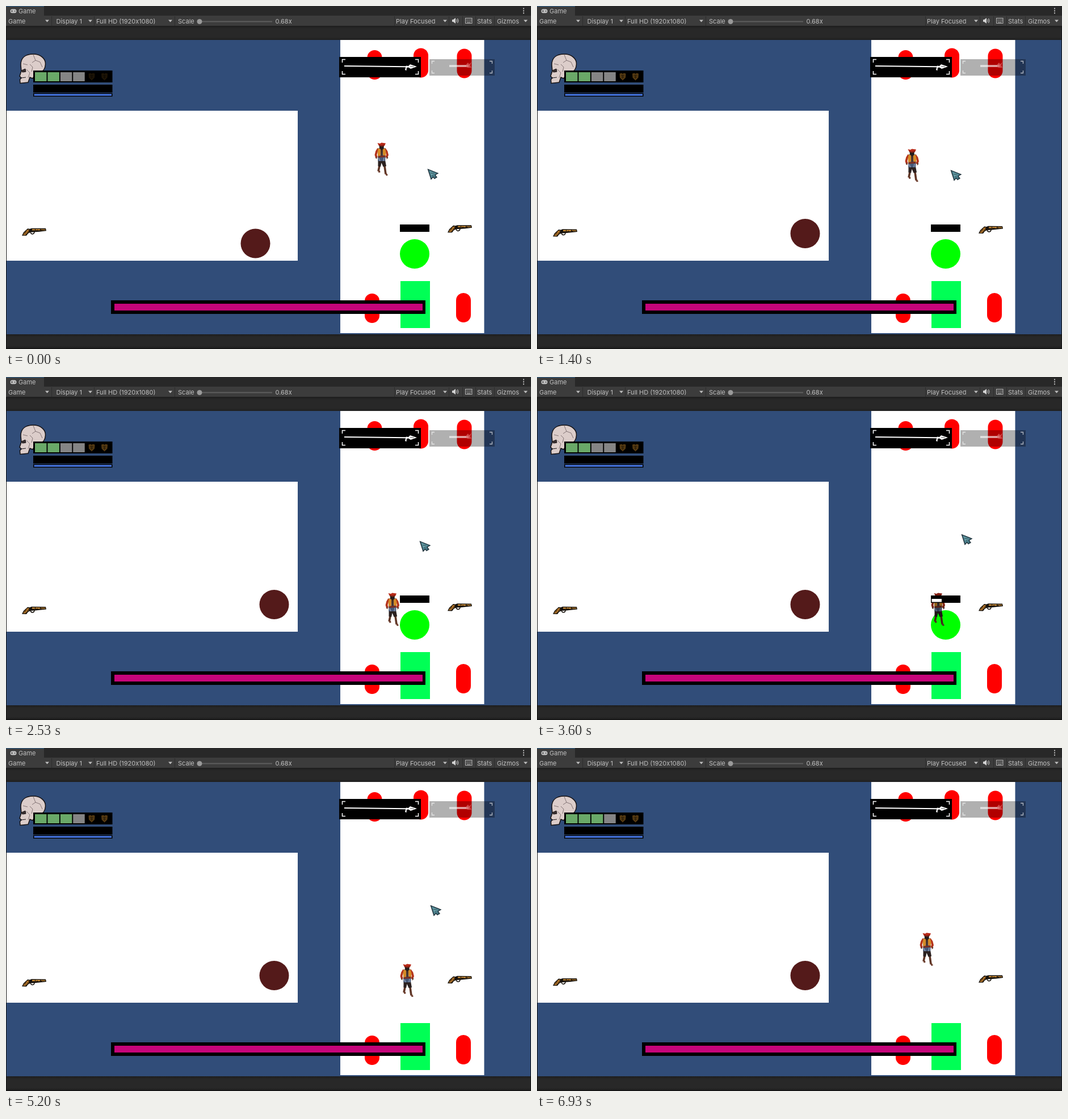
These frames come from a looping animation (925 px wide and 606 px high, 6.99 s). An HTML page:

```html
<!DOCTYPE html>
<html lang="en">
<head>
<meta charset="utf-8">
<title>Game view</title>
<style>
  html, body { margin: 0; width: 100%; height: 100%; overflow: hidden; background: #282828; }
  svg { display: block; width: 925px; height: 606px; }
  text { font: 11px Inter, "Liberation Sans", sans-serif; fill: #c0c0c0; }
</style>
</head>
<body>
<svg viewBox="0 0 925 606">
  <defs>
    <linearGradient id="edge" x2="0" y2="1">
      <stop offset="0" stop-color="#1d1d1d"/><stop offset=".2" stop-color="#282828"/>
      <stop offset=".8" stop-color="#282828"/><stop offset="1" stop-color="#1f1f1f"/>
    </linearGradient>
    <path id="drop" d="M0 0H7L3.5 4Z" fill="#c0c0c0"/>
    <rect id="pill" width="26" height="52" rx="13" fill="#f00"/>
    <g id="gun">
      <path d="M10 1.5L14 2 17 .8 42 1 43 5.5 31 6.8 24 7.5 15 8 11 10 8 14 0 13.8 3 8Z" fill="#15100a"/>
      <path d="M9 3.8L13 3 12 7.5 8 10.5 6.5 12.6 2 12.6 5 8Z" fill="#b8792c"/>
      <path d="M18 3.4H41" stroke="#cf8f38" stroke-width="2.2" stroke-dasharray="5 1 8 1.5"/>
      <path d="M8 5L5 11M13 4L9 9M22 6L28 4M32 5L37 3" stroke="#2a1b0b" stroke-width="1"/>
      <path d="M15 7.5Q16 11.5 19 11Q22 10.5 22 7" fill="none" stroke="#15100a" stroke-width="1.5"/>
    </g>
    <g id="shield">
      <path d="M-5.5 -5L-2 -6 0 -4.5 2 -6 5.5 -5 5 2 0 7 -5 2Z" fill="#553a12"/>
      <path d="M-3 -2H3M-2.5 1H2.5M0 -3V4" stroke="#241806" stroke-width="1"/>
    </g>
  </defs>

  <!-- editor chrome -->
  <rect width="925" height="606" fill="#282828"/>
  <rect width="67" height="18" fill="#3c3c3c"/>
  <rect width="67" height="1" fill="#2c5d87"/>
  <rect y="17" width="925" height="18" fill="#3c3c3c"/>
  <rect y="35" width="925" height="25" fill="url(#edge)"/>
  <rect y="580" width="925" height="25" fill="url(#edge)"/>
  <rect y="604.5" width="925" height="1.5" fill="#151515"/>
  <path d="M80.5 18V35M155.5 18V35M297.5 18V35M684.5 18V35M780.5 18V35M804.5 18V35M827.5 18V35M860.5 18V35" stroke="#2d2d2d"/>
  <g id="labels"></g>
  <rect x="7.500" y="5.500" width="11" height="7" rx="3.500" fill="#c4c4c4"/>
  <path d="M9 9H12M10.500 7.500V10.500M14 9H17" stroke="#3c3c3c"/>
  <path d="M912 3.500V5.500M912 7.500V9.500M912 11.500V13.500" stroke="#c0c0c0" stroke-width="2"/>
  <use href="#drop" x="69" y="24.500"/><use href="#drop" x="145" y="24.500"/>
  <use href="#drop" x="286" y="24.500"/><use href="#drop" x="770" y="24.500"/>
  <use href="#drop" x="912" y="24.500"/>
  <path d="M345 27.500H469" stroke="#5e5e5e" stroke-width="2"/>
  <circle cx="341" cy="27.500" r="4.500" fill="#999"/>
  <path d="M786 24H788L792 21V31L788 28H786Z" fill="#d0d0d0"/>
  <path d="M793.500 23.500Q795.500 26 793.500 28.500M795.500 22Q798.500 26 795.500 30" fill="none" stroke="#d0d0d0"/>
  <rect x="809.500" y="21.500" width="11.500" height="9" fill="none" stroke="#b5b5b5"/>
  <path d="M811 24H820M811 26.500H820" stroke="#b5b5b5" stroke-dasharray="1.500 1"/>
  <path d="M812 29H818.500" stroke="#b5b5b5"/>

  <!-- level -->
  <rect y="60" width="925" height="520" fill="#314d79"/>
  <rect y="185" width="514" height="265" fill="#fff"/>
  <rect x="589" y="60" width="253.500" height="518" fill="#fff"/>
  <use href="#pill" x="636.500" y="78"/><use href="#pill" x="718" y="74.500"/>
  <use href="#pill" x="794.500" y="75.500"/><use href="#pill" x="632" y="508"/>
  <use href="#pill" x="793" y="507"/>
  <rect x="695" y="486" width="52" height="83" fill="#00ff55"/>
  <circle id="ball" r="26" fill="#541a1a"/>
  <circle id="pickup" cx="720" cy="438" r="26" fill="#0f0"/>
  <use id="gunL" href="#gun"/>
  <use id="gunR" href="#gun"/>

  <g id="hero">
    <path d="M8 33L7.500 44 6 51M15.500 33L17.500 45 19 56" fill="none" stroke="#5e3526" stroke-width="3.600"/>
    <path d="M5 49L9 50 9.500 53 6.500 53.500ZM17 54L20.500 54 23 58 20 59Z" fill="#6f4030"/>
    <path d="M5.500 31L18 31 20 42 14.500 43 11.500 36 10 43 5.500 42Z" fill="#2b2120"/>
    <path d="M6 11L3 16 1.500 22 3 27M17 11L20.500 16 22 22 20 27" fill="none" stroke="#b5341c" stroke-width="3.800"/>
    <path d="M2 24L1 28 4 29M21 24L23.500 27 20.500 30" fill="#5e3526"/>
    <path d="M6 10L17.500 10 19 22 18 33 5.500 33 5 21Z" fill="#46597a"/>
    <path d="M6 10L10 12 10 23 5.500 25 4.500 17ZM17.500 10L14 12 14 22 18.500 25 19.500 17Z" fill="#d58a25"/>
    <path d="M10 12H14L13 25 11 25Z" fill="#4a3024"/>
    <path d="M6 24L18 23 18 26 6 27Z" fill="#7a2f22"/>
    <path d="M7 28L9 33M16 27L15 33" stroke="#8c9db2" stroke-width="1.500"/>
    <path d="M7.500 5H16L15.500 11 12 13.500 8 10.500Z" fill="#261c1a"/>
    <path d="M4.500 1L9 2 11.500 .5 19 1.500 17 6 12 7 7 6Z" fill="#b92a18"/>
    <path d="M7 4.800Q12 7 16.500 4.500" fill="none" stroke="#621710"/>
  </g>

  <g id="meter">
    <rect x="694" y="386" width="52" height="13"/>
    <rect id="fill" x="695.500" y="392" height="5.500" fill="#fff"/>
  </g>

  <!-- boss bar -->
  <rect x="185" y="520" width="554" height="24"/>
  <rect x="191" y="526" width="543" height="12" fill="#c6057a"/>

  <!-- weapon slots -->
  <rect x="587" y="90" width="144" height="36"/>
  <path d="M592.500 100V94.500H598M721 94.500H726.500V100M592.500 115V120.500H598M721 120.500H726.500V115" fill="none" stroke="#fff" stroke-width="1.500"/>
  <path d="M596 106L706 107.300" stroke="#fff" stroke-width="2"/>
  <path d="M705 105.500L709 106 712 103 724 107 713 111 709 108.500 706 109 705.500 114 703 113 704 109Z" fill="#fff"/>
  <path d="M712 107H719" stroke="#555"/>
  <rect x="746" y="94" width="115" height="29" fill="#000" fill-opacity=".31"/>
  <g opacity=".65">
    <path d="M750.500 102V97.500H755M852 97.500H856.500V102M750.500 114V118.500H755M852 118.500H856.500V114" fill="none" stroke="#fff" stroke-width="1.300"/>
    <path d="M781 106H815" stroke="#fff" stroke-width="3.500"/>
  </g>
  <path d="M811 103L814 100 816 103 820 99 818 105 820 109 814 109 811 108Z" fill="#d66" opacity=".7"/>

  <!-- player status -->
  <path d="M26 104C26 90 36 85 48 85C62 85 70 94 69.500 103C69 111 65 116 60 117L51 121 47 128 42 126 39 135 25 136.500 24.500 130 27 127 24 124 27 115Z" fill="#dccdca" stroke="#161214" stroke-width="1.500"/>
  <path d="M27 114L34 111 35 116 29 117ZM27 127L35 126" fill="#3a3030" stroke="#1d1719"/>
  <path d="M36 112L42 118 39 127M42 103L47 108 45 116M48 86L52 96 60 99 64 108M30 102L38 104M52 96L46 100" fill="none" stroke="#6d5d60" stroke-width=".8"/>
  <rect x="48" y="114" width="139.500" height="21"/>
  <g id="cells"></g>
  <g id="shields"><use href="#shield" x="151" y="124.500"/><use href="#shield" x="173.500" y="124.500"/></g>
  <rect x="48" y="139" width="139.500" height="14"/>
  <rect x="48" y="154" width="139.500" height="6"/>
  <rect x="49.500" y="155.500" width="136.500" height="3" fill="#4a7df0"/>

  <g id="cursor">
    <path d="M.5 .5L18 7.500 13 10.500 16 14.500 12 17 9.500 14 6 18Z" fill="#4b7f8c" stroke="#1c2d36" stroke-width="1.300"/>
    <path d="M3.500 3.500L12.500 8 7 13Z" fill="#6aa0a8"/>
    <path d="M5 7L11 8M7 12L10 10M12 13L14 15" stroke="#284852"/>
  </g>
  <path d="M.5 36V606M924.500 36V606" stroke="#161616"/>
</svg>
<script>
const LOOP = 6990, STEP = 66.6;
const $ = id => document.getElementById(id);
const NS = "http://www.w3.org/2000/svg";

function add(parent, tag, attrs, text = "") {
  const el = document.createElementNS(NS, tag);
  for (const k in attrs) el.setAttribute(k, attrs[k]);
  el.textContent = text;
  parent.append(el);
  return el;
}

[["Game", 22, 13], ["Game", 4, 30.5], ["Display 1", 88.5, 30.5],
 ["Full HD (1920x1080)", 159, 30.5], ["Scale", 303, 31], ["0.68x", 474.5, 31],
 ["Play Focused", 687, 30.5], ["Stats", 830, 30.5], ["Gizmos", 865, 30.5]]
  .forEach(([s, x, y]) => add($("labels"), "text", { x, y }, s));

const cells = [0, 1, 2, 3].map(i =>
  add($("cells"), "rect", { x: 51 + i * 22.4, y: 117, width: 20.5, height: 16 }));

// Each track is a list of [time, x, y].
const hero = [[0, 650, 241], [70, 649, 252], [1470, 649, 252], [2303, 649, 381], [2400, 649, 381],
  [2700, 695, 381], [5330, 695, 381], [5460, 675, 361], [5685, 675, 326]];
const cursor = [[0, 743, 288], [200, 743, 288], [600, 729, 290], [3000, 729, 290], [3400, 748, 278],
  [5400, 748, 278], [5750, 751, 273], [5900, 751, 273], [6110, 746, 568], [6111, 746, 700]];
const ball = [[0, 439.5, 419.5], [200, 454, 411.7], [450, 466, 405.4], [800, 472.5, 402]];
const fillStart = 3240, fillEnd = 4240;

const clamp = v => Math.max(0, Math.min(1, v));

function at(track, t) {
  const i = track.findIndex(k => k[0] > t);
  if (i < 0) return track[track.length - 1].slice(1);
  const [a, b] = [track[i - 1], track[i]];
  const u = (t - a[0]) / (b[0] - a[0]);
  return [a[1] + (b[1] - a[1]) * u, a[2] + (b[2] - a[2]) * u];
}

function place(id, [x, y]) {
  $(id).setAttribute("transform", `translate(${x.toFixed(2)} ${y.toFixed(2)})`);
}

function draw(t) {
  const bob = 8.5 * Math.cos(2 * Math.PI * (t - 6765) / 1480);
  place("gunL", [28, 399.5 + bob]);
  place("gunR", [778, 394 + bob]);
  place("hero", at(hero, t));
  place("cursor", at(cursor, t));
  place("ball", at(ball, t));

  const taken = t >= fillEnd;
  const filling = t >= fillStart && !taken;
  $("pickup").style.display = $("meter").style.display = taken ? "none" : "";
  $("fill").setAttribute("width", filling ? 49 * (t - fillStart) / (fillEnd - fillStart) : 0);
  $("hero").style.filter = filling ? "brightness(.7)" : "";
  cells.forEach((c, i) => c.setAttribute("fill", i < (taken ? 3 : 2) ? "#6aa968" : "#858585"));
  $("shields").setAttribute("opacity", 0.35 + 0.65 * clamp(t / 900));
}

const start = performance.now();
function tick() {
  const t = (performance.now() - start) % LOOP;
  draw(Math.min(104, Math.floor((t + 5) / STEP)) * STEP);
  requestAnimationFrame(tick);
}
draw(0);
tick();
</script>
</body>
</html>
```
